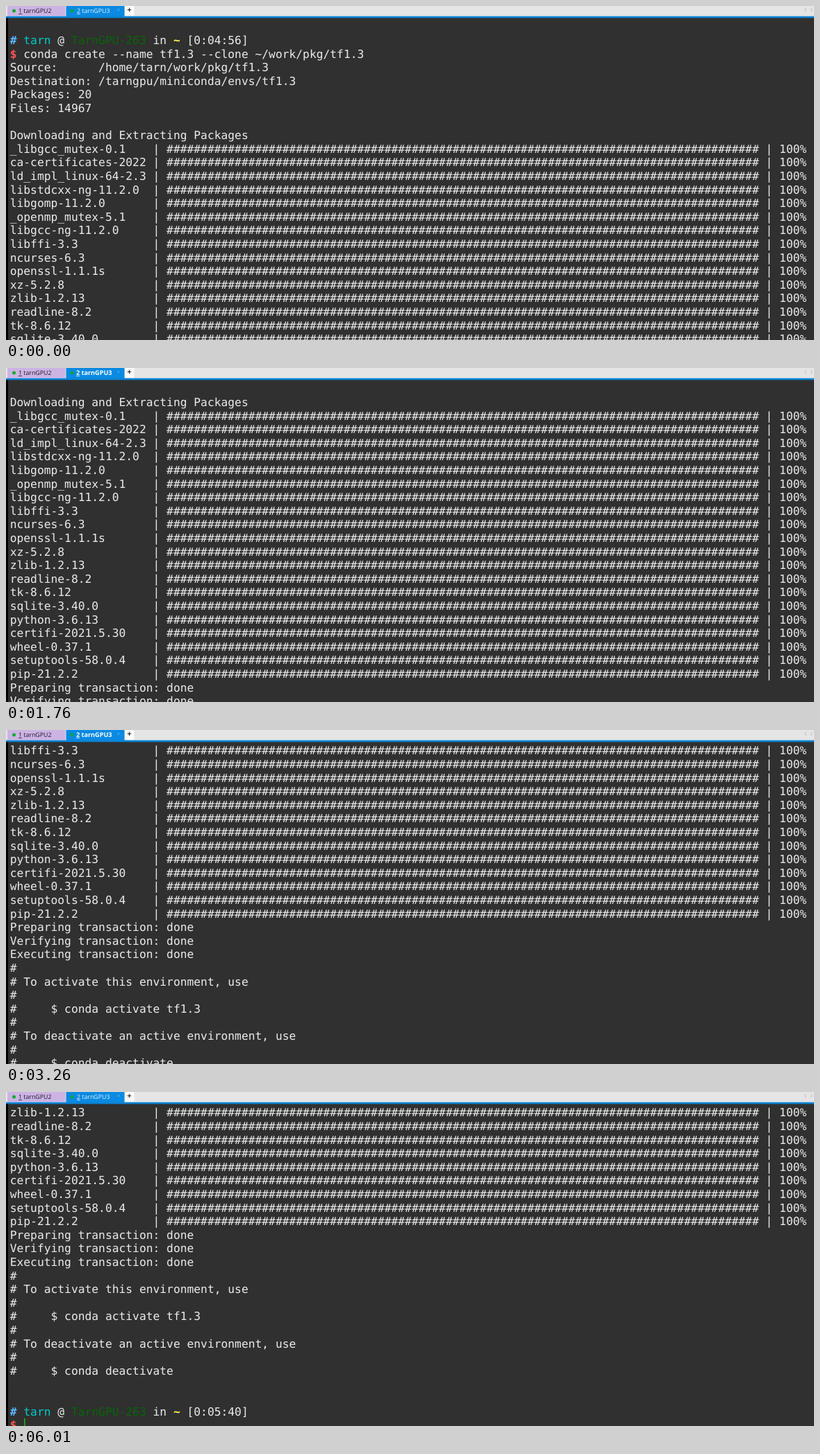
Animation of 1163x482 px, one loop 6.11 s. Source, as an HTML page with a canvas:

```html
<!DOCTYPE html>
<html lang="en">
<head>
<meta charset="utf-8">
<title>Terminal scroll</title>
<style>
html, body { margin: 0; width: 100%; height: 100%; overflow: hidden; background: #303030; }
canvas { display: block; }
</style>
</head>
<body>
<canvas id="stage" width="1163" height="482"></canvas>
<script>
const ctx = document.getElementById('stage').getContext('2d');
const LOOP = 6110;
const CELL_W = 9.8, CELL_H = 19.6, LEFT = 5.7, BASELINE = 35.3, ROWS = 24;
const MONO = '16.28px "DejaVu Sans Mono", monospace';
const UI = '"Open Sans", "Noto Sans", sans-serif';
const WHITE = '#ececec', GREEN = '#0a640a', CYAN = '#00cdcd';

// A line is a list of [text, colour, bold] runs.
const plain = text => [[text, WHITE]];
const prompt = time => [
  ['# ', '#5cb8ff', true], ['tarn', CYAN], [' @ ', WHITE], ['TarnGPU-263', GREEN],
  [' in ', WHITE], ['~', '#ffff55', true], [` [${time}]`, WHITE]
];
const command = text => [['$ ', '#ff5555', true], [text, WHITE]];
const packageLine = name => plain(`${name.padEnd(20)} | ${'#'.repeat(87)} | 100%`);

const packages = `_libgcc_mutex-0.1 ca-certificates-2022 ld_impl_linux-64-2.3
  libstdcxx-ng-11.2.0 libgomp-11.2.0 _openmp_mutex-5.1 libgcc-ng-11.2.0 libffi-3.3
  ncurses-6.3 openssl-1.1.1s xz-5.2.8 zlib-1.2.13 readline-8.2 tk-8.6.12 sqlite-3.40.0
  python-3.6.13 certifi-2021.5.30 wheel-0.37.1 setuptools-58.0.4 pip-21.2.2`.split(/\s+/);

const lines = [
  plain(''),
  prompt('0:04:56'),
  command('conda create --name tf1.3 --clone ~/work/pkg/tf1.3'),
  ...[
    'Source:      /home/tarn/work/pkg/tf1.3',
    'Destination: /tarngpu/miniconda/envs/tf1.3',
    'Packages: 20',
    'Files: 14967',
    '',
    'Downloading and Extracting Packages'
  ].map(plain),
  ...packages.map(packageLine),
  ...[
    'Preparing transaction: done',
    'Verifying transaction: done',
    'Executing transaction: done',
    '#',
    '# To activate this environment, use',
    '#',
    '#     $ conda activate tf1.3',
    '#',
    '# To deactivate an active environment, use',
    '#',
    '#     $ conda deactivate',
    '',
    ''
  ].map(plain),
  prompt('0:05:40'),
  command('')
];

// [time, value] steps; each value holds until the next time.
const scrollSteps = [
  [0, 0], [1080, 1], [1370, 3], [1460, 5], [1560, 6], [1760, 7], [1960, 8],
  [2360, 9], [2460, 10], [2560, 11], [2660, 12], [2760, 14], [2860, 15],
  [3260, 16], [3360, 17], [3660, 18], [3760, 19], [3860, 20]
];
const caretSteps = [[0, 0], [4360, 1], [4910, 0], [5410, 1], [5910, 0], [6010, 1]];
const activeSteps = [[0, 0], [680, 1], [6010, 0]];
const pointerSteps = [[0, 0], [4650, 1], [4730, 0]];
const valueAt = (steps, t) => steps.filter(([start]) => start <= t).pop()[1];

function rect(color, x, y, w, h) {
  ctx.fillStyle = color;
  ctx.fillRect(x, y, w, h);
}

function stroke(color, width, path) {
  ctx.strokeStyle = color;
  ctx.lineWidth = width;
  ctx.stroke(new Path2D(path));
}

function tabLabel(x, number, name, color, font) {
  ctx.font = font;
  ctx.fillStyle = color;
  ctx.fillText(`${number} ${name}`, x, 10.3);
  rect(color, x, 11.2, ctx.measureText(number).width, 0.8);
}

function dot(x, color) {
  ctx.fillStyle = color;
  ctx.beginPath();
  ctx.arc(x, 7, 2.5, 0, 7);
  ctx.fill();
}

function drawTabs(active) {
  rect('#e5e5e5', 0, 0, 1163, 15);
  rect('#ccb3e4', 2, 0, 83.5, 14.5);
  rect('#0a8ae2', 86.5, 0, 84, 15);
  rect('#fbfbfb', 171, 0, 13.5, 14);
  rect('#0a84d6', 0, 14.7, 1163, 2.6);
  dot(11.5, '#0fae2c');
  dot(95, '#0ba63c');
  tabLabel(18, '1', 'tarnGPU2', '#1c1824', `8.8px ${UI}`);
  if (active) tabLabel(101, '2', 'tarnGPU3', '#ffffff', `bold 9.1px ${UI}`);
  else tabLabel(102, '2', 'tarnGPU3', '#e8f4fd', `8.8px ${UI}`);
  stroke('#58b2ee', 0.8, 'M160.5 4l3 3m0-3l-3 3');
  stroke('#222', 1.1, 'M174.8 5.5h5.4M177.5 2.8v5.4');
  stroke('#b4b4b4', 1, 'M1152 3l-2.5 2.5l2.5 2.5M1158 3l2.5 2.5l-2.5 2.5');
}

function drawLine(runs, y) {
  let column = 0;
  for (const [text, color, bold] of runs) {
    ctx.font = (bold ? 'bold ' : '') + MONO;
    ctx.fillStyle = color;
    for (const char of text) {
      if (char !== ' ') ctx.fillText(char, LEFT + column * CELL_W, y);
      column++;
    }
  }
}

function draw(scroll, caret, active, pointer) {
  ctx.textRendering = 'geometricPrecision';
  rect('#303030', 0, 0, 1163, 482);
  rect('#000', 0, 17, 3, 465);
  lines.slice(scroll, scroll + ROWS).forEach((runs, row) =>
    drawLine(runs, BASELINE + row * CELL_H));
  if (caret) rect('#18b218', 26, 471, 1.6, 11);
  if (pointer) stroke('#d8d8d8', 0.8, 'M1146.2 462.5h3.6M1148 462.5v9M1146.2 471.5h3.6');
  drawTabs(active);
}

let shown = '';
function tick() {
  const t = performance.now() % LOOP;
  const state = [scrollSteps, caretSteps, activeSteps, pointerSteps].map(s => valueAt(s, t));
  if (state.join() !== shown) {
    shown = state.join();
    draw(...state);
  }
  requestAnimationFrame(tick);
}
tick();
</script>
</body>
</html>
```
